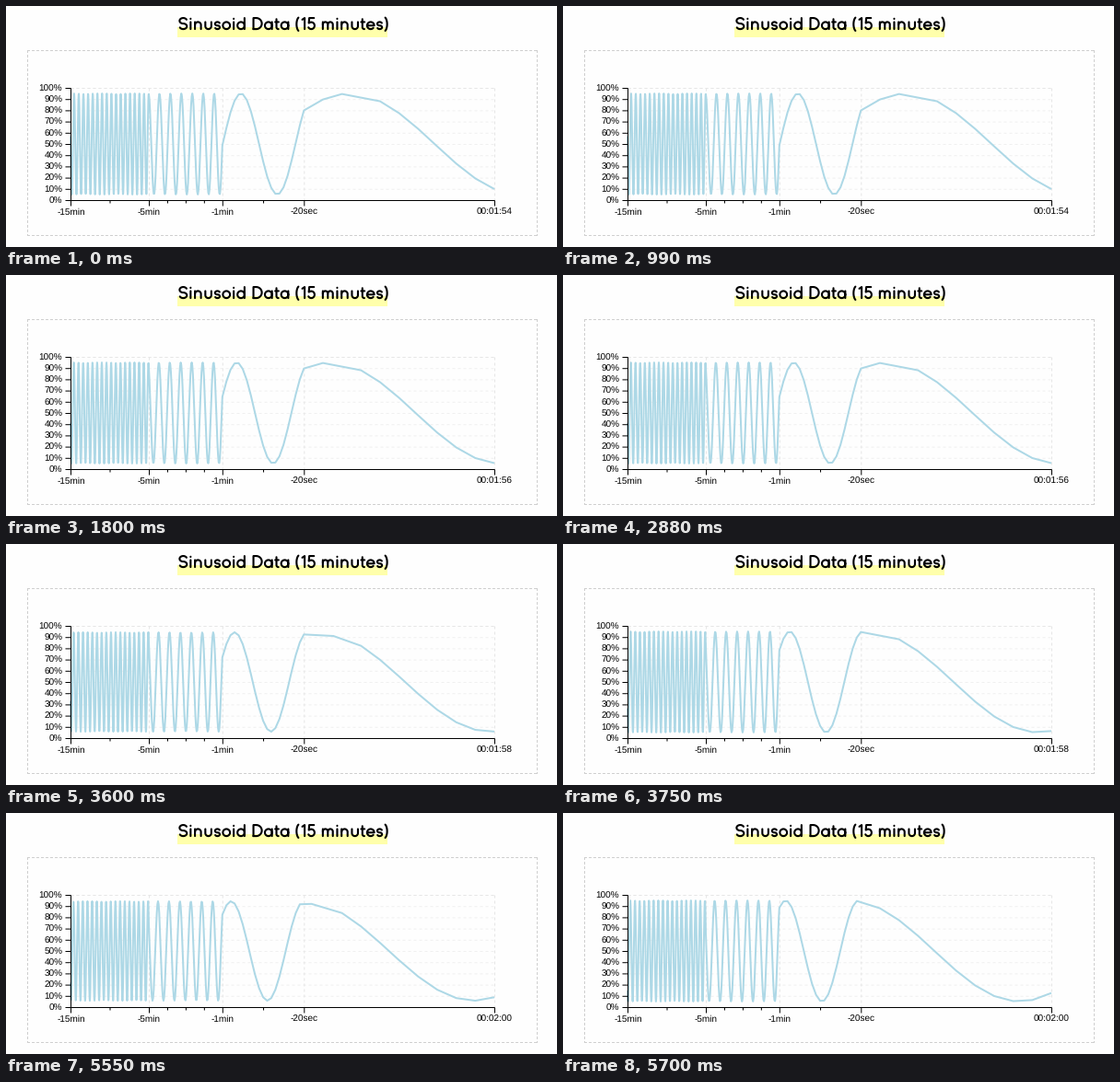
Animation of 598x262 px, one loop 7350 ms. Source, as a matplotlib script:

```python
import math

import numpy as np
import matplotlib.pyplot as plt
from matplotlib.animation import FuncAnimation
from matplotlib.patches import Rectangle

plt.rcParams.update({"path.snap": False, "text.hinting": "none",
                     "text.hinting_factor": 1})

W, H, DPI = 598, 262, 100
PX = 72 / DPI
LEFT, RIGHT, TOP, BOTTOM = 70, 530, 89, 211
CRISP = 0.5            # axis lines sit on pixel centres

# Piecewise-linear time axis: seconds before now and their positions
AGES = [0, 20, 60, 300, 900]
AGE_X = [RIGHT, 323.3, 234.8, 155, LEFT]
AGE_LABELS = ["", "-20sec", "-1min", "-5min", "-15min"]
MINOR_AGES = [40, 120, 180, 240, 600]

INTERVAL, FRAMES = 150, 49
SAMPLE_GAP, SAMPLES = 2, 451
PHASE, PHASE_STEP = 243.2, 20.16
DROPPED = 7            # one sample is missing from the stream
START_SECONDS = 114
# Frame of each update and how far the line has eased by then
UPDATES = [(11, 0.25), (24, 0.55), (37, 0.4)]

fig = plt.figure(figsize=(W / DPI, H / DPI), dpi=DPI, facecolor="#fefefe")
ax = fig.add_axes([0, 0, 1, 1])
ax.set_xlim(0, W)
ax.set_ylim(H, 0)
ax.axis("off")


def stroke(xs, ys, color="black", width=1, **kw):
    return ax.plot(xs, ys, color=color, lw=width * PX, **kw)[0]


def rule(x0, y0, x1, y1, color="black", dash=None, zorder=4):
    style = (0, dash) if dash else "-"
    stroke([x0, x1], [y0, y1], color, linestyle=style, zorder=zorder,
           solid_capstyle="butt", dash_capstyle="butt")


def label(x, y, text, ha="center"):
    return ax.text(x, y, text, ha=ha, va="baseline", color="black",
                   family="Liberation Sans", size=10 * PX, zorder=5)


def age_to_x(age):
    return np.interp(age, AGES, AGE_X)


def value_to_y(value):
    return BOTTOM - (BOTTOM - TOP) * value / 100


# ---- title lettering: round pen strokes, baseline at 0, y up ----

def arc(cx, cy, rx, ry, start, end):
    a = np.radians(np.linspace(start, end, 40))
    return [(cx + rx * math.cos(t), cy + ry * math.sin(t)) for t in a]


XH, CAP, R, ARCH = 7.8, 12.2, 3.9, 3.3
BOWL = arc(R, R, R, R, 0, 360)


def ess(w, h):
    return [arc(w / 2, h * .75, w / 2, h / 4, 25, 270)
            + arc(w / 2, h * .25, w / 2, h / 4, 90, -155)]


def arch(x, r):
    return arc(x + r, XH - r, r, r, 180, 0) + [(x + 2 * r, 0)]


ROUND, STEM, TIGHT = 1.7, 2.4, 1.1
# letter: (strokes, width, left bearing, right bearing)
GLYPHS = {
    "S": (ess(8, CAP), 8, ROUND, ROUND),
    "s": (ess(5.2, XH), 5.2, ROUND, ROUND),
    "i": ([[(0, 0), (0, XH)], [(0, 11.2), (0, 11.5)]], 0, STEM, STEM),
    "n": ([[(0, 0), (0, XH)], arch(0, ARCH)], 2 * ARCH, STEM, STEM),
    "m": ([[(0, 0), (0, XH)], arch(0, 2.75), arch(5.5, 2.75)], 11, STEM, STEM),
    "u": ([[(0, XH)] + arc(ARCH, ARCH, ARCH, ARCH, 180, 360)
           + [(2 * ARCH, XH)]], 2 * ARCH, STEM, STEM),
    "o": ([BOWL], 2 * R, ROUND, ROUND),
    "a": ([BOWL, [(2 * R, XH), (2 * R, 0)]], 2 * R, ROUND, STEM),
    "d": ([BOWL, [(2 * R, CAP), (2 * R, 0)]], 2 * R, ROUND, STEM),
    "e": ([[(0, R), (2 * R, R)] + arc(R, R, R, R, 0, 318)],
          2 * R, ROUND, ROUND),
    "t": ([[(1.4, 11)] + arc(3.6, 2.2, 2.2, 2.2, 180, 270),
           [(0, XH), (3.8, XH)]], 3.8, TIGHT, TIGHT),
    "D": ([[(0, 0), (0, CAP), (3, CAP)]
           + arc(3, CAP / 2, 6.2, CAP / 2, 90, -90) + [(0, 0)]],
          9.2, STEM, ROUND),
    "1": ([[(0, 10.4), (2.6, CAP), (2.6, 0)]], 2.6, STEM, STEM),
    "5": ([[(6.2, CAP), (1, CAP), (.5, 6.7)]
           + arc(3.2, 3.8, 3.6, 3.8, 125, -150)], 6.8, ROUND, ROUND),
    "(": ([arc(3.6, 5.4, 3.6, 8, 115, 245)], 2.2, ROUND, ROUND),
    ")": ([arc(-1.4, 5.4, 3.6, 8, 65, -65)], 2.2, ROUND, ROUND),
    " ": ([], 5, 0, 0),
}


def draw_title(text, x, baseline, scale):
    for i, char in enumerate(text):
        strokes, width, before, after = GLYPHS[char]
        x += before * scale * (i > 0)
        for points in strokes:
            px, py = np.array(points).T
            stroke(x + px * scale, baseline - py * scale, width=2.1,
                   solid_capstyle="round", solid_joinstyle="round", zorder=3)
        x += (width + after) * scale


# ---- static parts ----

ax.add_patch(Rectangle((186, 23), 228, 11, color="#ffffab", lw=0))
draw_title("Sinusoid Data (15 minutes)", 188.4, 25.1, 0.987)

for y in (48.5, 249.5):
    rule(23, y, 577, y, "#cfcfcf", (3, 2))
for x in (23.5, 576.5):
    rule(x, 48, x, 250, "#cfcfcf", (3, 2))

x0, x1, y0, y1 = (edge + CRISP for edge in (LEFT, RIGHT, TOP, BOTTOM))

for value in range(0, 101, 10):
    y = value_to_y(value) + CRISP
    rule(x0, y, x1, y, "#f0f0f0", (3, 3), zorder=1)
    rule(x0 - 6, y, x0, y)
    label(x0 - 9.2, y + 3.2, f"{value}%", "right")

for age, text in zip(AGES, AGE_LABELS):
    x = age_to_x(age) + CRISP
    rule(x, y0, x, y1, "#e6e6e6", (3, 3), zorder=1)
    rule(x, y1, x, y1 + 6)
    label(x, 227, text)
for age in MINOR_AGES:
    x = age_to_x(age) + CRISP
    rule(x, y1, x, y1 + 3)

rule(x0, y0, x1, y0, "#e6e6e6", (3, 3), zorder=1)
rule(x0, y0, x0, y1)
rule(x0, y1, x1, y1)

# ---- moving parts ----

curve = stroke([], [], "#add8e6", 2, zorder=2, solid_joinstyle="round",
               solid_capstyle="butt")
clock = label(x1, 227, "")


def samples(step):
    """Points of the line, newest first, after a number of updates."""
    k = np.delete(np.arange(SAMPLES), DROPPED + step)
    phase = np.radians(PHASE + PHASE_STEP * (step - k))
    return np.array([age_to_x(k * SAMPLE_GAP),
                     value_to_y(50 + 45 * np.sin(phase))])


def progress(frame):
    return sum(1 if frame > start else eased
               for start, eased in UPDATES if frame >= start)


def update(frame):
    done = progress(frame)
    step = math.floor(done)
    t = done - step
    points = samples(step)
    if t:
        points = points * (1 - t) + samples(step + 1) * t
    curve.set_data(*points)
    seconds = START_SECONDS + SAMPLE_GAP * math.ceil(done)
    clock.set_text(f"00:{seconds // 60:02d}:{seconds % 60:02d}")
    return curve, clock


anim = FuncAnimation(fig, update, frames=FRAMES, interval=INTERVAL,
                     repeat=True, repeat_delay=0)
plt.show()
```
